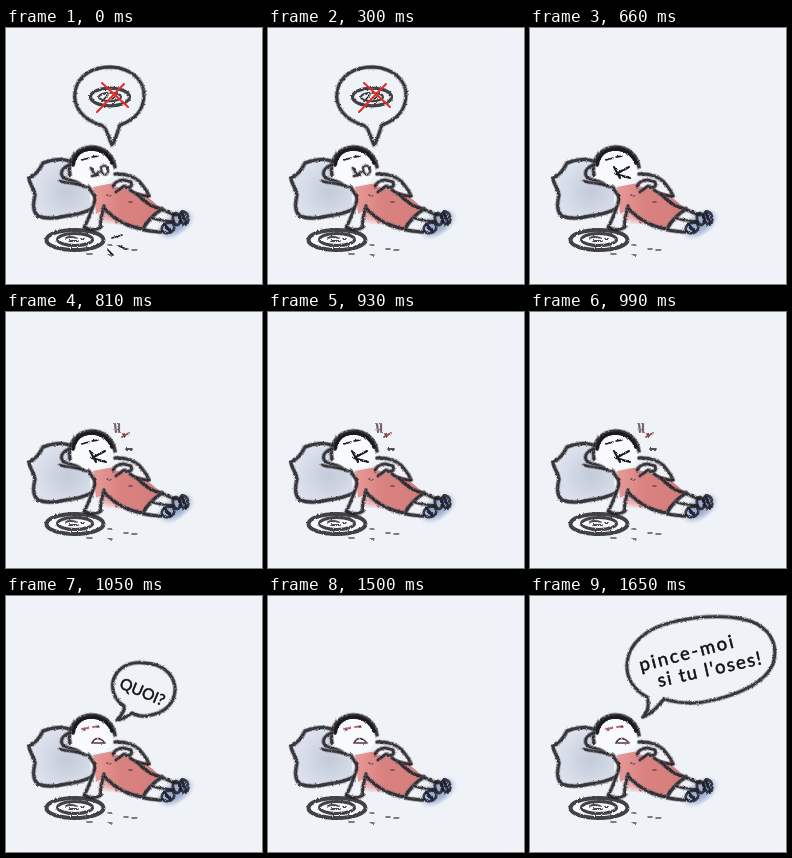
An HTML page for the animation above (2550 ms loop, 256 px wide and 256 px high).

```html
<!DOCTYPE html>
<html lang="fr">
<head>
<meta charset="utf-8">
<title>Sieste</title>
<style>
  html, body { margin: 0; width: 100%; height: 100%; overflow: hidden; background: #eff3f8; }
  svg { display: block; width: 100vw; height: 100vh; }
  text { font-family: Lato, "Open Sans", sans-serif; fill: #111; stroke: #111; stroke-width: .5; }
  .ink path, .ink ellipse { fill: none; stroke-linecap: round; stroke-linejoin: round; }
</style>
</head>
<body>
<svg id="stage" viewBox="0 0 256 256"></svg>
<script>
const LOOP = 2550;
const DARK = '#1b1a1e';

// A charcoal line: soft grey edge under a dark core.
const ink = (d, w = 2.8) =>
  `<path d="${d}" stroke="#77727a" stroke-opacity=".6" stroke-width="${w + 1.8}"/>` +
  `<path d="${d}" stroke="${DARK}" stroke-opacity=".8" stroke-width="${w}"/>`;
const pen = (d, w = 1.6, color = DARK) =>
  `<path d="${d}" stroke="${color}" stroke-width="${w}"/>`;
const ring = (cx, cy, rx, ry, w = 2.4, turn = 0) =>
  `<ellipse cx="${cx}" cy="${cy}" rx="${rx}" ry="${ry}" stroke="${DARK}" stroke-opacity=".82"
    stroke-width="${w}" transform="rotate(${turn} ${cx} ${cy})"/>`;
const fill = (d, color) => `<path d="${d}" fill="${color}"/>`;
const lines = body => `<g class="ink" filter="url(#rough)">${body}</g>`;
const part = (id, body) => `<g id="${id}">${body}</g>`;

const pillow = 'M63 133C55 130 45 132 37 135C34 142 29 147 23 150C23 155 28 160 29 167' +
  'C27 175 27 184 32 188C42 192 52 190 60 188C69 187 78 185 85 181';
const head = 'M64 147C61 132 70 120 85 119C98 119 107 127 109 139';
const dress = 'M87 159L108 155L124 151L138 166L156 181C147 187 141 193 137 201' +
  'C123 199 111 194 99 181L90 186Z';

const washes =
  fill(pillow + 'L83 157L64 154Z', 'url(#cushion)') +
  fill(head + 'C106 155 94 158 84 158C73 158 66 153 64 147Z', '#f8fafc') +
  '<ellipse cx="106" cy="187" rx="12" ry="7" fill="#e9716f" opacity=".6" filter="url(#soft)"/>' +
  fill(dress, 'url(#cloth)') +
  '<ellipse cx="170" cy="196" rx="17" ry="9" fill="#7189bd" opacity=".65" filter="url(#soft)" transform="rotate(-35 170 196)"/>' +
  fill('M108 146C122 144 138 152 143 167L124 162L108 158Z', '#f0f2f6');

const sleeper = lines(
  ink(pillow, 3) + ink(head, 3) +
  pen('M67 137C69 125 78 121 87 121C96 122 103 127 106 135', 3.6) +
  ink('M64 137C56 139 53 146 58 150C63 153 69 152 74 156', 2.6) +
  ink('M54 153C61 156 70 154 80 159', 2.2) +
  ink('M83 159C85 165 91 167 88 175C86 183 82 191 79 198', 2.8) +
  ink('M98 178C97 186 93 191 95 199C90 203 83 202 78 199', 2.8) +
  ink('M109 146C119 145 129 149 134 154C138 159 142 164 143 168', 2.8) +
  ink('M143 168C136 168 130 167 124 162', 2.6) +
  ink('M107 158C111 151 118 151 125 154C127 159 123 161 118 158L110 164', 2.6) +
  ink('M131 166C139 175 147 180 156 181', 3) +
  ink('M156 181C147 187 141 193 137 201C123 199 111 194 99 181', 3.2) +
  ink('M157 182C162 184 166 186 170 187M138 202C144 203 150 204 156 204', 2.8) +
  ink('M146 190C153 193 160 192 167 194', 2) +
  ring(178, 190, 4, 6.5, 3.2, -12) + ring(170.5, 191, 3.5, 6, 3, -12) +
  ring(162, 200, 6.5, 5, 2.6, -20) +
  pen('M176 185L180 195M158 196L164 203', 3, '#20263a') +
  pen('M101 167L104 168M123 174L126 174', 1.5, '#65484d') +
  pen('M109 194L111 195', 1.5, '#df514f')
);

const plate = lines(
  '<ellipse cx="69" cy="212" rx="29" ry="10" style="fill:#f6f8fb"/>' +
  ring(69, 212, 28.5, 10, 4) + ring(69, 211.5, 17.5, 6, 3) +
  pen('M60 210C63 208 67 209 71 210M64 213L72 213M75 211L78 211', 1.8, '#4a494f') +
  pen('M81 226H86M102 227H106M102 217H106M118 221H122M126 222H131', 1.5, '#55545a')
);

const eyes = 'M76 132L83 130M86 129L92 128';

const scenes =
  part('crumbs', lines(pen('M106 210L116 207M102 222L107 227M113 218L120 221', 1.7))) +
  part('chewing', lines(
    pen(eyes, 1.5) +
    ink('M85 140L89 147L93 144M86 148L92 147', 2) +
    ink('M95 139C99 136 103 139 102 144C100 149 95 147 95 139', 1.6))) +
  part('dream', lines(
    ink('M95 97C77 92 67 79 69 64C72 46 88 39 105 39C125 40 138 52 138 67' +
        'C138 82 128 92 114 97C111 104 110 112 106 117C102 109 101 99 95 97') +
    ring(104, 69, 19.5, 8.8, 3.2) + ring(104, 69, 11, 4.2, 2) +
    pen('M98 71L102 67M106 71L110 68', 1.4)) +
    '<g class="ink">' + pen('M96 55L122 79M118 56L91 84', 2, '#ea2824') + '</g>') +
  part('asleep', lines(pen(eyes, 1.5) + pen('M84 139L90 150M99 139L86 146L100 150', 2.1))) +
  part('jolt', lines(
    pen('M109 112L110 120M113 112L113 120', 2.2, '#77656d') +
    pen('M116 125L123 121M117 122L119 124', 1.8, '#8a4b50') +
    pen('M120 137H126', 1.7))) +
  part('awake', lines(
    pen('M76 133L82 132M87 131L93 130', 1.8, '#c15c72') +
    pen('M77 134L79 134M91 131L93 131', 1.2) +
    pen('M86 147C89 141 94 141 99 147L88 147', 1.7, '#51363f'))) +
  part('what', lines(
    ink('M118 110C109 104 105 94 107 85C111 71 124 65 139 67C156 68 167 77 169 91' +
        'C170 106 159 117 145 119C138 121 131 120 126 117C122 120 116 124 111 124C116 119 119 115 118 110')) +
    '<text font-size="15.5" transform="translate(112.5 91.5) rotate(23)">QUOI?</text>') +
  part('dare', lines(
    ink('M117 101C104 94 96 82 97 68C98 48 116 32 143 26C172 19 207 18 227 28' +
        'C243 37 248 52 243 68C235 86 213 97 184 104C164 109 147 107 134 103' +
        'C128 110 122 118 113 121C119 114 119 107 117 101')) +
    '<text font-size="18.5" letter-spacing="2" transform="translate(111 75.5) rotate(-14.5)">pince-moi</text>' +
    '<text font-size="18.5" letter-spacing="1.5" transform="translate(129 91) rotate(-12.5)">si tu l\'oses!</text>');

const stage = document.getElementById('stage');
stage.innerHTML = `
  <defs>
    <filter id="rough" filterUnits="userSpaceOnUse" x="0" y="0" width="256" height="256" color-interpolation-filters="sRGB">
      <feTurbulence type="fractalNoise" baseFrequency=".45" numOctaves="2" seed="4"/>
      <feDisplacementMap in="SourceGraphic" scale="2.5" xChannelSelector="R" yChannelSelector="G"/>
    </filter>
    <filter id="soft"><feGaussianBlur stdDeviation="2.5"/></filter>
    <radialGradient id="cushion" cx=".62" cy=".55" r=".6">
      <stop stop-color="#c3cad9"/><stop offset="1" stop-color="#dfe5ef"/>
    </radialGradient>
    <linearGradient id="cloth">
      <stop stop-color="#e79a98"/><stop offset=".4" stop-color="#da8280"/><stop offset="1" stop-color="#d47d7b"/>
    </linearGradient>
  </defs>
  <rect width="256" height="256" fill="#eff3f8"/>
  ${washes}${sleeper}${plate}${scenes}`;

// Visible spans [from, to) in ms.
const spans = {
  crumbs: [[0, 300]],
  chewing: [[0, 660]],
  dream: [[0, 660]],
  asleep: [[660, 1050]],
  jolt: [[690, 780], [810, 900], [930, 1050]],
  awake: [[1050, LOOP]],
  what: [[1050, 1500]],
  dare: [[1650, LOOP]]
};
const parts = Object.entries(spans).map(([id, times]) => [document.getElementById(id), times]);

function draw(t) {
  for (const [node, times] of parts) {
    const on = times.some(([from, to]) => t >= from && t < to);
    node.setAttribute('display', on ? 'inline' : 'none');
  }
}

let start;
function tick(now) {
  start ??= now;
  draw((now - start) % LOOP);
  requestAnimationFrame(tick);
}
draw(0);
requestAnimationFrame(tick);
</script>
</body>
</html>
```
